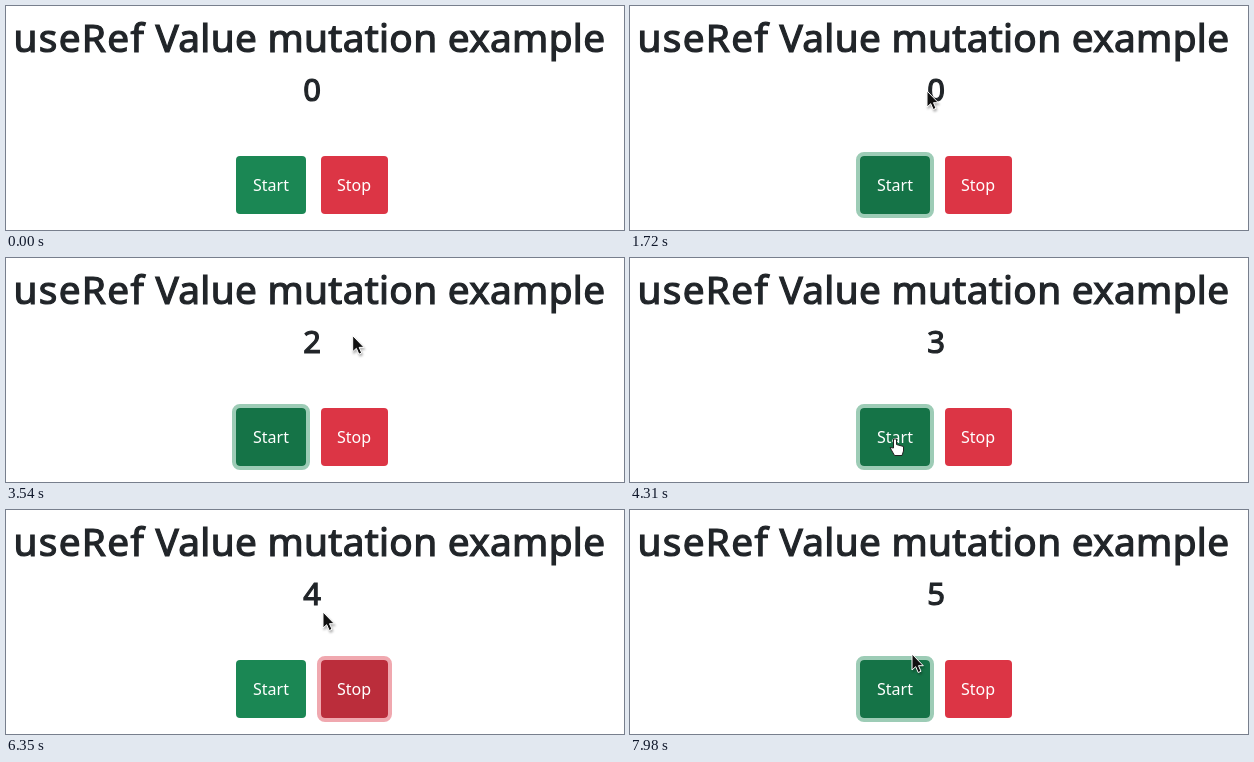
Animation, 618 px wide and 224 px high, one loop 8 s. Source, as an HTML page:

```html
<!DOCTYPE html>
<html lang="en">
<head>
<meta charset="utf-8">
<title>useRef Value mutation example</title>
<style>
  html, body { margin: 0; width: 100%; height: 100%; overflow: hidden; background: #fff; }
  svg { display: block; font-family: "Noto Sans", "Open Sans", sans-serif; }
  /* A thin outline gives a medium weight */
  .heading { fill: #212529; stroke: #212529; stroke-width: 1.2; }
  .title { font-size: 38.8px; letter-spacing: .3px; }
  .title tspan { letter-spacing: 1.3px; }
  #count { font-size: 31px; text-anchor: middle; }
  .button text { font-size: 16px; fill: #fff; text-anchor: middle; }
  .ring { fill: none; stroke-width: 4; }
  .pointer { stroke-linejoin: round; }
  #arrow { fill: #111; stroke: #fff; filter: drop-shadow(1px 2px 1px rgba(0, 0, 0, .3)); }
  #hand { fill: #fff; stroke: #222; }
</style>
</head>
<body>
<svg width="618" height="224" viewBox="0 0 618 224">
  <text class="heading title" x="7.5" y="46"><tspan>useRef</tspan> Value mutation example</text>
  <text class="heading" id="count" x="306" y="95">0</text>
  <g class="button" id="start">
    <rect class="ring" x="228" y="148" width="74" height="62" rx="6" stroke="#3c996e"/>
    <rect class="face" x="230" y="150" width="70" height="58" rx="4"/>
    <text x="265" y="185">Start</text>
  </g>
  <g class="button" id="stop">
    <rect class="ring" x="313" y="148" width="71" height="62" rx="6" stroke="#e15361"/>
    <rect class="face" x="315" y="150" width="67" height="58" rx="4"/>
    <text x="348" y="185">Stop</text>
  </g>
  <path class="pointer" id="arrow" d="M0 0V16L3.7 12.7L6.2 18.5L9 17.3L6.5 11.7H11.3Z"/>
  <path class="pointer" id="hand" d="M-1.5 9V0H1.5V5.5L8.5 7.5V12L7 16.5H-.5L-5 8.5Z"/>
</svg>
<script>
const LOOP = 8000, SECOND = 1000, FADE = 150, TRAVEL = 550;
const START_CLICK = 1020, STOP_CLICK = 5320, RESTART_CLICK = 6900;

const spots = {
  outside: [300, 250],
  start: [265, 181],
  stop: [346, 188],
  digit: [297, 85],
  beside: [348, 76],
  below: [317, 102],
  edge: [282, 144]
};

// Each move leaves at its time and takes TRAVEL ms
const moves = [
  [340, "start"], [1120, "digit"], [1950, "beside"], [3500, "start"],
  [4480, "stop"], [5500, "below"], [6350, "start"], [7300, "edge"]
];

const byId = id => document.getElementById(id);
const clamp = v => Math.max(0, Math.min(1, v));
const smooth = v => v * v * (3 - 2 * v);
const mix = (a, b, v) => a + (b - a) * v;
const mixAll = (a, b, v) => a.map((n, k) => mix(n, b[k], v));

const pointerAt = t => moves.reduce(
  (point, [time, spot]) => mixAll(point, spots[spot], smooth(clamp((t - time) / TRAVEL))),
  spots.outside
);

function makeButton(id, normal, active) {
  const face = byId(id).querySelector(".face");
  const ring = byId(id).querySelector(".ring");
  const box = face.getBBox();
  const hit = ([x, y]) =>
    x >= box.x && x <= box.x + box.width && y >= box.y && y <= box.y + box.height;
  return {
    hit,
    draw(t, focus) {
      // Averaging recent hover states gives a linear colour fade
      const steps = 10;
      let hover = 0;
      for (let k = 0; k < steps; k++) hover += hit(pointerAt(t - k * FADE / steps)) / steps;
      const colour = mixAll(normal, active, Math.max(hover, focus)).map(Math.round);
      face.setAttribute("fill", `rgb(${colour})`);
      ring.setAttribute("stroke-opacity", focus / 2);
    }
  };
}

const start = makeButton("start", [27, 135, 84], [21, 115, 71]);
const stop = makeButton("stop", [220, 53, 69], [187, 45, 59]);

const ticks = (t, from, to) => Math.max(0, Math.floor((Math.min(t, to) - from) / SECOND));

function draw(t) {
  const ramp = time => clamp((t - time) / FADE);
  const stopFocus = ramp(STOP_CLICK) - ramp(RESTART_CLICK);
  start.draw(t, ramp(START_CLICK) - stopFocus);
  stop.draw(t, stopFocus);
  byId("count").textContent =
    ticks(t, START_CLICK, STOP_CLICK) + ticks(t, RESTART_CLICK, LOOP);

  const point = pointerAt(t);
  const overButton = start.hit(point) || stop.hit(point);
  for (const id of ["arrow", "hand"]) {
    const visible = (id === "hand") === overButton;
    byId(id).setAttribute("transform", `translate(${point})`);
    byId(id).setAttribute("visibility", visible ? "visible" : "hidden");
  }
}

function frame() {
  draw(performance.now() % LOOP);
  requestAnimationFrame(frame);
}
frame();
</script>
</body>
</html>
```
